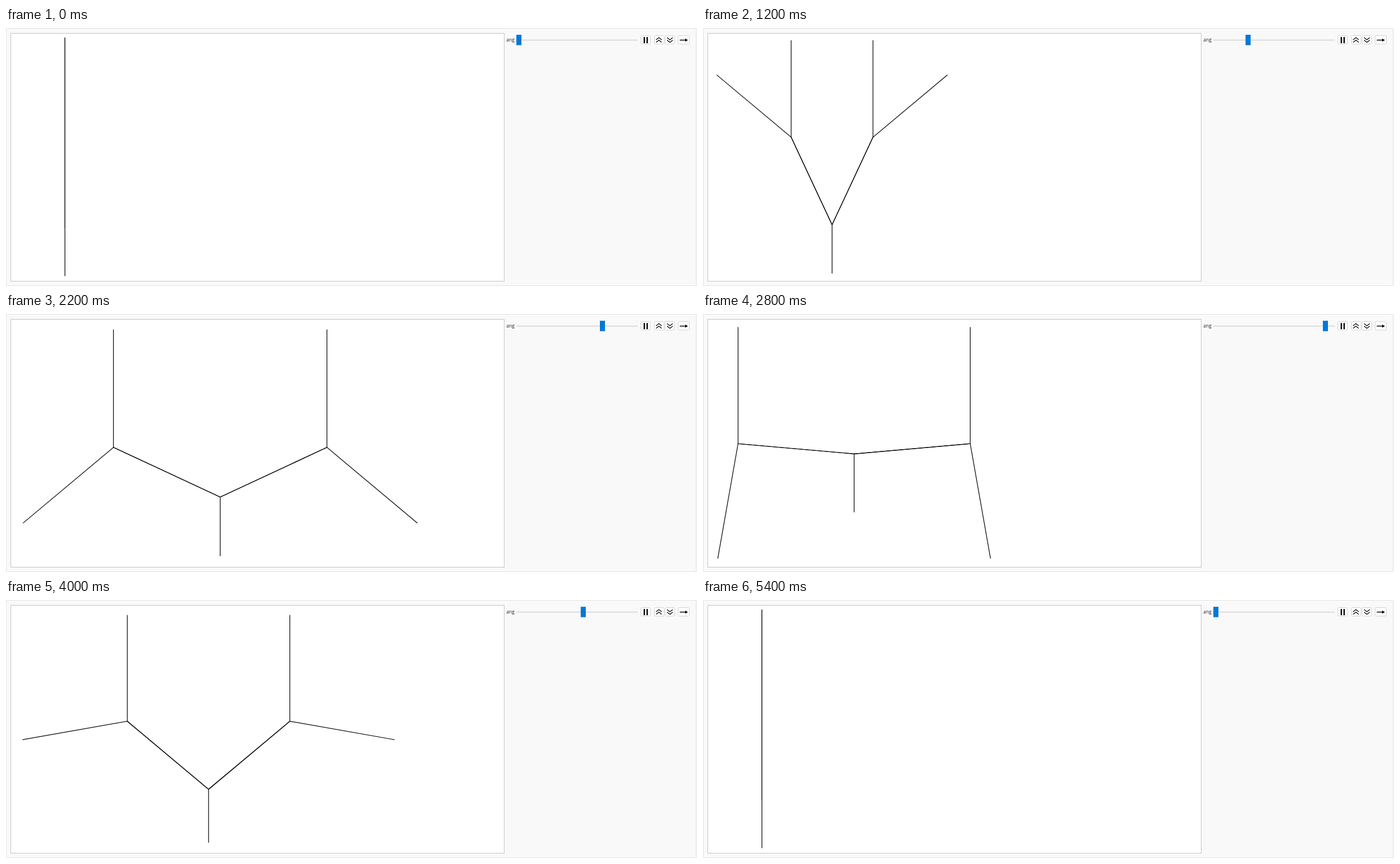
An HTML page that plays this animation: 1224x458 px, repeating every 6 s.

```html
<!DOCTYPE html>
<html lang="en">
<head>
<meta charset="utf-8">
<title>Branching tree</title>
<style>
  html, body { margin: 0; width: 100%; height: 100%; overflow: hidden; background: #f9f9f9; }
  svg { display: block; }
  .ink { fill: none; stroke: #000; }
  .button { fill: #fff; stroke: #d2d2d2; }
  text { font: 8.5px "Open Sans", "Noto Sans", sans-serif; fill: #222; }
</style>
</head>
<body>
<svg width="1224" height="458" viewBox="0 0 1224 458">
  <rect x=".5" y=".5" width="1222" height="457" fill="#f9f9f9" stroke="#e3e3e3"/>
  <rect x="8.5" y="9.5" width="874" height="440" fill="#fff" stroke="#c3c3c3"/>
  <path id="tree" class="ink" stroke-width="1.2" stroke-linecap="square"/>
  <path id="limbs" class="ink" stroke-width="1.2" stroke-linecap="square"/>

  <text x="886.3" y="24">ang</text>
  <rect x="904" y="20.5" width="215" height="2" fill="#dcdcdc"/>
  <rect id="thumb" y="12" width="9" height="18.5" fill="#0078d7"/>

  <g class="button">
    <rect x="1124.5" y="13.5" width="17" height="15" rx="2"/>
    <rect x="1148.5" y="13.5" width="17" height="15" rx="2"/>
    <rect x="1167.5" y="13.5" width="17" height="15" rx="2"/>
    <rect x="1190.5" y="13.5" width="20" height="15" rx="2"/>
  </g>
  <path class="ink" stroke-width="2.4" d="M1130.7 16v11M1135.7 16v11"/>
  <path class="ink" stroke-width="1.3" d="M1151.5 21l5-4 5 4m-10 4.5l5-4 5 4M1171 17l5 4 5-4m-10 4.5l5 4 5-4M1193.5 21.5h12"/>
  <path d="M1203 18.7l5 2.8-5 2.8z"/>
</svg>
<script>
const LOOP = 6000, TICK = 100, STEP = 5, MAX_ANGLE = 90;
const LEFT = 16.6, TOP = 14.2, HEIGHT = 429, PADDING = 0.02;
const find = id => document.getElementById(id);

// The slider rises and falls in steps of five degrees, resting at both ends.
function sliderAngle(time) {
  const tick = Math.floor(time / TICK);
  const mirrored = Math.min(tick, LOOP / TICK - 1 - tick);
  return STEP * Math.max(0, Math.ceil((mirrored - 5.62) / 1.36));
}

function drawTree(degrees) {
  const angle = degrees * Math.PI / 180;
  const forkX = Math.sin(angle), forkY = 0.5 + Math.cos(angle);
  const tipX = forkX + Math.sin(2 * angle), tipY = forkY + Math.cos(2 * angle);

  // Fit the tree to the panel height; a flat tree counts as one unit wide.
  const width = 2 * tipX || 1;
  const top = forkY + 1, bottom = Math.min(0, tipY), pad = PADDING * width;
  const scale = HEIGHT / (top - bottom + 2 * pad);
  const point = (x, y) =>
    `${LEFT + (x + width / 2 + pad) * scale} ${TOP + (top + pad - y) * scale}`;
  const line = (x1, y1, x2, y2) => `M${point(x1, y1)}L${point(x2, y2)}`;

  const limbs = [-1, 1].map(side => line(0, 0.5, side * forkX, forkY)).join("");
  const twigs = [-1, 1].map(side =>
    line(side * forkX, forkY, side * forkX, top) +
    line(side * forkX, forkY, side * tipX, tipY)).join("");
  find("tree").setAttribute("d", line(0, 0, 0, 0.5) + limbs + twigs);
  find("limbs").setAttribute("d", limbs + (degrees ? "" : twigs));
}

function render() {
  const angle = sliderAngle(performance.now() % LOOP);
  drawTree(angle % MAX_ANGLE); // the tree folds up again at the end stop
  find("thumb").setAttribute("x", Math.ceil(903.1 + angle * 2.286));
  requestAnimationFrame(render);
}
render();
</script>
</body>
</html>
```
